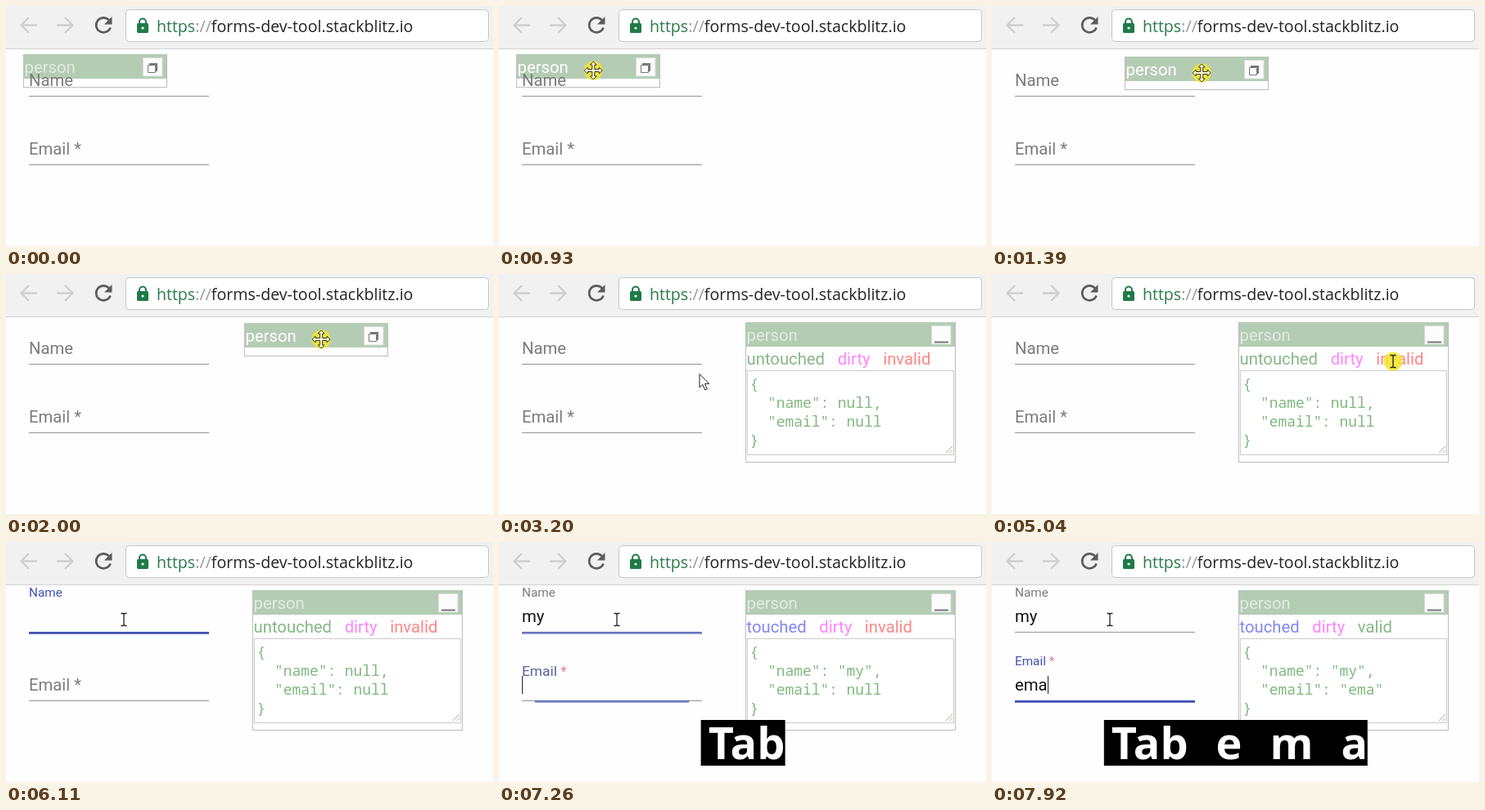
An HTML page for the animation above (8 s loop, 595 px wide and 294 px high).

```html
<!DOCTYPE html>
<html lang="en">
<meta charset="utf-8">
<title>Form dev tool</title>
<style>
  html, body { margin: 0; width: 100%; height: 100%; overflow: hidden; background: #fefefe; }
  svg { position: absolute; left: 0; top: 0; font: 20.3px Roboto, sans-serif; }
  .url { font: 19.6px "Open Sans", sans-serif; }
  .json text { font: 17.9px "Noto Sans Mono", monospace; fill: #7db87d; white-space: pre; }
  #keys {
    position: absolute; left: 298px; top: 218px; height: 56px; padding-left: 9px;
    transform: translateX(-50%); background: #000; color: #fff; white-space: nowrap;
    font: bold 54px/54px "Open Sans", sans-serif; word-spacing: 20px;
  }
</style>
<svg id="stage" width="595" height="294">
  <rect width="595" height="52" fill="#f1f1f1"/>
  <path d="M0 52.5H595" stroke="#d2d2d2"/>
  <g fill="none" stroke="#cfcfcf" stroke-width="2.4">
    <path d="M38 23.5H19M28 14L18.5 23.5L28 33"/>
    <path d="M62 23.5H81M72 14L81.5 23.5L72 33"/>
    <path d="M126 17.5A9 9 0 1 0 127.6 26.5" stroke="#5c5c5c" stroke-width="2.6"/>
  </g>
  <path d="M129.5 13V22.5H120Z" fill="#5c5c5c"/>
  <rect x="146.5" y="4.5" width="443" height="39" rx="4" fill="#fff" stroke="#c6c6c6"/>
  <rect x="160" y="21" width="14" height="12" rx="1.5" fill="#1f7a48"/>
  <path d="M163 22V19.5A4 4 0 0 1 171 19.5V22" fill="none" stroke="#1f7a48" stroke-width="2"/>
  <circle cx="167" cy="27" r="1.6" fill="#fff"/>
  <text class="url" x="184" y="32" fill="#222"><tspan fill="#2b7a4b">https</tspan><tspan fill="#999">://</tspan>forms-dev-tool.stackblitz.io</text>

  <g id="widget">
    <rect id="frame" x=".5" y=".5" fill="#fff" stroke="#bdbdbd"/>
    <rect id="header" x="1" y="0" height="30" fill="#b4ccb4"/>
    <text id="title" x="1.5" y="23" fill="#fff">person</text>
    <g id="button">
      <rect x=".5" y=".5" width="23.5" height="22.5" fill="#fcfcfc" stroke="#d8dcd8"/>
      <g id="restore" fill="none" stroke="#777">
        <path d="M6.5 9.5H15.5V18.5H6.5Z"/>
        <path d="M8 8H17V17" stroke-width="2"/>
      </g>
      <path id="minimise" d="M4 20.5H21" stroke="#777" stroke-width="2"/>
    </g>
    <g id="body">
      <text id="status" x="1.5" y="52"></text>
      <rect x="2.5" y="59.5" width="252" height="103" fill="#fff" stroke="#ccc"/>
      <path d="M245 160L253 152M249.5 160L253 156.5" stroke="#9cbc9c"/>
      <g class="json">
        <text x="5.5" y="82">{</text>
        <text id="jsonName" x="5.5" y="105"></text>
        <text id="jsonEmail" x="5.5" y="128"></text>
        <text x="5.5" y="151">}</text>
      </g>
    </g>
  </g>

  <g id="fields"></g>

  <g id="cursor">
    <circle id="press" r="11.5" fill="#f2e62c" opacity=".85"/>
    <path id="arrow" d="M.5 .5V17L4.4 13.4L7.2 20L9.8 18.9L7 12.4H12.2Z" fill="#fff" stroke="#222"/>
    <path id="move" d="M0-11L4-7H1.5V-1.5H7V-4L11 0L7 4V1.5H1.5V7H4L0 11L-4 7H-1.5V1.5H-7V4L-11 0L-7-4V-1.5H-1.5V-7H-4Z" fill="#fffbd0" stroke="#333"/>
    <path id="beam" d="M-3.5-7.5H-1L0-6.5L1-7.5H3.5M0-6.5V6.5M-3.5 7.5H-1L0 6.5L1 7.5H3.5" fill="none" stroke="#222" stroke-width="1.3"/>
  </g>
</svg>
<div id="keys"></div>
<script>
const LOOP = 8000, GRAB = 930, DROP = 2100, EXPAND = 2590, FOCUS = 5520, TAB = 7180;
const $ = id => document.getElementById(id);
const clamp = p => Math.min(1, Math.max(0, p));
const ease = p => 1 - (1 - clamp(p)) ** 4;
const lerp = (a, b, p) => a + (b - a) * p;
const show = (id, on) => $(id).setAttribute('visibility', on ? 'inherit' : 'hidden');
const set = (el, attrs) => { for (const k in attrs) el.setAttribute(k, attrs[k]); };

// time, x, y
const route = [
  [90, 337, 264], [450, 205, 135], [830, 115, 79], [GRAB, 115, 79], [1390, 256, 82],
  [1720, 325, 80], [2000, 385, 80], [DROP, 395, 79], [2310, 460, 78], [2920, 460, 78],
  [3200, 245, 122], [3380, 158, 125], [3710, 364, 104], [3790, 364, 100], [4300, 445, 101],
  [4480, 445, 101], [5040, 490, 107], [5140, 490, 107], [5270, 217, 105], [5320, 217, 105],
  [5370, 166, 101], [FOCUS, 144, 95]
];
const presses = [[GRAB, DROP], [EXPAND, 2740], [3700, 3850], [4280, 4480], [4950, 5140], [FOCUS, 5620]];
const strokes = [[6670, 'm'], [6780, 'y'], [TAB, 'Tab'], [7600, 'e'], [7770, 'm'], [7920, 'a']];

function cursorAt(t) {
  const i = route.findIndex(p => p[0] > t);
  if (i < 0) return route.at(-1).slice(1);
  if (i === 0) return route[0].slice(1);
  const [a, b] = [route[i - 1], route[i]], p = (t - a[0]) / (b[0] - a[0]);
  return [lerp(a[1], b[1], p), lerp(a[2], b[2], p)];
}

function makeField(name, star, top, focusAt, blurAt) {
  const g = document.createElementNS('http://www.w3.org/2000/svg', 'g');
  g.innerHTML = `<path d="M28 110.5H248" stroke="#949494"/>
    <rect y="110" height="2.8" fill="#3f51b5"/>
    <text x="28">${name}<tspan>${star}</tspan></text>
    <text x="28" y="98" fill="#111"></text>
    <path stroke="#222"/>`;
  g.setAttribute('transform', `translate(0 ${top})`);
  $('fields').append(g);
  const [, bar, label, input, caret] = g.children;
  return (t, value, caretOn) => {
    const up = ease((t - focusAt) / 400);
    const active = t >= blurAt ? 0 : up;
    const spread = lerp(.5, 1, ease((t - focusAt) / 300));
    const fade = clamp((t - focusAt) / 120) * (1 - clamp((t - blurAt) / 250));
    set(bar, { x: 138 - 110 * spread, width: 220 * spread, opacity: fade });
    set(label, { y: lerp(98, 67, up) });
    label.style.fontSize = lerp(20.3, 15.3, up) + 'px';
    label.style.fill = `color-mix(in srgb, #3f51b5 ${active * 100}%, #7b7b7b)`;
    label.lastChild.style.fill = active > .5 ? '#e07c98' : '';
    input.textContent = value;
    const x = Math.round(28 + input.getComputedTextLength()) + .5;
    set(caret, { d: `M${x} 80V102`, opacity: +caretOn });
  };
}
const nameField = makeField('Name', '', 0, FOCUS, TAB);
const emailField = makeField('Email', ' *', 84, TAB, Infinity);

function drawWidget(t, x, y, open, hover, name, email) {
  const width = open ? 257 : 176;
  set($('widget'), { transform: `translate(${x} ${y})` });
  set($('frame'), { width: width - 1, height: open ? 171 : 40 });
  set($('header'), { width: width - 2 });
  set($('title'), { opacity: hover ? 1 : .6 });
  set($('button'), { transform: `translate(${width - 30} 4)` });
  show('restore', !open);
  show('minimise', open);
  show('body', open);
  const words = [
    t < TAB ? ['untouched', '#86b886'] : ['touched', '#8585f2'],
    ['dirty', '#ff85ff'],
    email ? ['valid', '#86b886'] : ['invalid', '#ff8585']
  ];
  $('status').innerHTML = words.map(([word, fill], i) =>
    `<tspan dx="${i && 15.6}" fill="${fill}">${word}</tspan>`).join('');
  const quote = s => s ? `"${s}"` : 'null';
  $('jsonName').textContent = `  "name": ${quote(name)},`;
  $('jsonEmail').textContent = `  "email": ${quote(email)}`;
}

function draw(t) {
  const [cx, cy] = cursorAt(t), open = t >= EXPAND;
  const [gx, gy] = cursorAt(Math.min(DROP, Math.max(GRAB, t)));
  const x = Math.round(gx - 94), y = Math.round(gy - 20);
  const inside = (l, top, w, h) => cx >= l && cx < l + w && cy >= top && cy < top + h;
  const width = open ? 257 : 176;
  const hover = t >= 90 && inside(x, y, width, 30);
  const onButton = inside(x + width - 30, y + 4, 24, 23);

  const typed = strokes.filter(s => s[0] <= t);
  const text = after => typed.filter(s => after ? s[0] > TAB : s[0] < TAB).map(s => s[1]).join('');
  const name = text(false), email = text(true);
  drawWidget(t, x, y, open, hover, name, email);
  nameField(t, name, t >= FOCUS && t < TAB && (t < 6080 || t >= 6670));
  emailField(t, email, t >= TAB);

  const kind = hover ? (onButton ? 'arrow' : 'move')
    : inside(28, 78, 220, 26) || open && inside(x, y + 30, 257, 141) ? 'beam' : 'arrow';
  for (const k of ['arrow', 'move', 'beam']) show(k, k === kind);
  show('press', presses.some(([a, b]) => t >= a && t < b));
  set($('cursor'), { transform: `translate(${cx} ${cy})`, visibility: t < 90 ? 'hidden' : 'visible' });

  const shown = typed.filter(s => t < TAB || s[0] >= TAB).map(s => s[1]);
  $('keys').textContent = shown.join(' ');
  $('keys').style.display = shown.length ? '' : 'none';
}

function frame() {
  draw(performance.now() % LOOP);
  requestAnimationFrame(frame);
}
frame();
</script>
</html>
```
